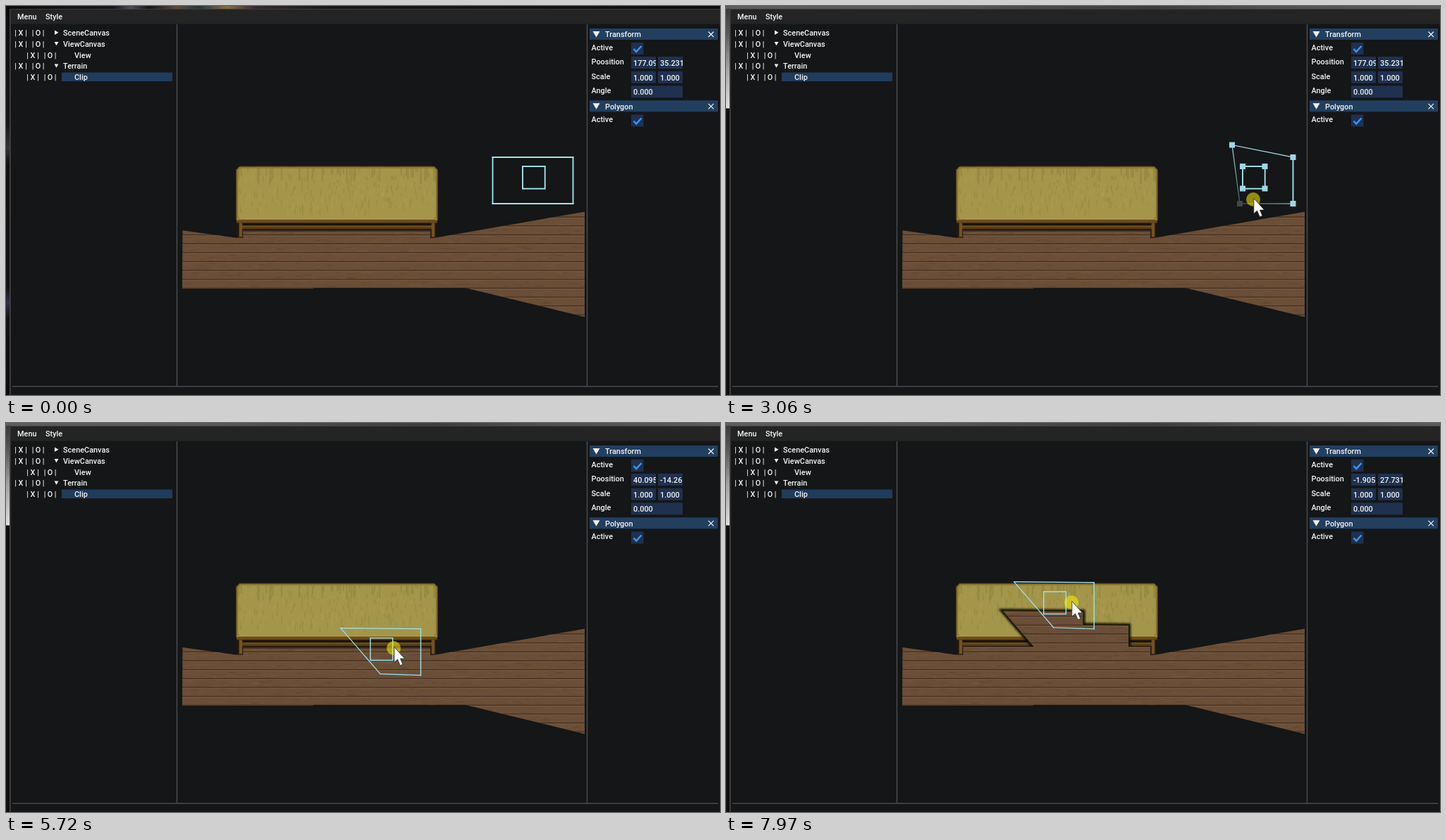
An HTML page that plays this animation: 1013x553 px, repeating every 8000 ms.

```html
<!DOCTYPE html>
<html lang="en">
<head>
<meta charset="utf-8">
<title>Terrain clip editor</title>
<style>
  html, body { margin: 0; width: 100%; height: 100%; overflow: hidden; background: #141617; }
  svg { display: block; }
  text { font: 500 10.9px Roboto, sans-serif; fill: #f4f4f4; white-space: pre; }
</style>
</head>
<body>
<svg id="stage" width="100%" height="100%" viewBox="0 0 1013 553" preserveAspectRatio="none"></svg>
<script>
const LOOP = 8000, UNIT = 1.577, UNIT_Y = 1.568;
const BG = '#141617', CYAN = '#9fe3ee', KNOB = '#9bd8e6', DIM = '#3b4a50', FADE = '#48606a';

let seed = 11;
const rnd = (a = 0, b = 1) => {
  seed = (seed * 16807) % 2147483647;
  return a + (b - a) * seed / 2147483647;
};

// ---- markup helpers ----
const $ = id => document.getElementById(id);
const set = (id, attrs) => {
  for (const k in attrs) $(id).setAttribute(k, attrs[k]);
};
const show = (id, on) => set(id, { display: on ? 'inline' : 'none' });
const rect = (x, y, w, h, fill, more = '') =>
  `<rect x="${x}" y="${y}" width="${w}" height="${h}" fill="${fill}" ${more}/>`;
const path = (d, fill, more = '') => `<path d="${d}" fill="${fill}" ${more}/>`;
const stroke = (d, color, w, more = '') => path(d, 'none', `stroke="${color}" stroke-width="${w}" ${more}`);
const text = (x, mid, s, more = '') => `<text x="${x}" y="${mid + 4}" ${more}>${s}</text>`;
const gradient = (id, stops, dir) =>
  `<linearGradient id="${id}" ${dir}>` +
  stops.map(([o, c]) => `<stop offset="${o}" stop-color="${c}"/>`).join('') + '</linearGradient>';

// ---- textures ----
function dashes(n, make) {
  let d = '';
  for (let i = 0; i < n; i++) {
    const [x, y, dx, dy] = make().map(v => +v.toFixed(1));
    d += `M${x} ${y}l${dx} ${dy}`;
  }
  return d;
}

function sofa() {
  const body = 'M331.500 228.500H607.500L612 233V304L609 307H330L327 304V233Z';
  const hang = () => [rnd(330, 609), 231, 0, rnd(3, 22)];
  const streak = () => [rnd(330, 609), rnd(236, 290), 0, rnd(3, 11)];
  return rect(329.5, 307, 7, 22, '#36240c') + rect(331, 307, 4, 21, '#76531b') +
    rect(602.5, 307, 7, 22, '#36240c') + rect(604, 307, 4, 21, '#76531b') +
    rect(336, 308, 267, 10, '#1b150c') + rect(335, 312.3, 269, 4.5, '#5c3f17') +
    rect(335, 312.3, 269, 1.2, '#79562a') + rect(327, 303, 285, 5.5, '#553810') +
    path(body, '#a3964a', 'stroke="#6b4f1c" stroke-width="1.4"') +
    stroke(dashes(55, hang), '#837a3a', 2, 'opacity=".42"') +
    stroke(dashes(150, streak), '#887d39', 1.3, 'opacity=".4"') +
    stroke(dashes(80, streak), '#b2a653', 1.3, 'opacity=".4"') +
    path('M332.500 230H606.500L610.500 234V300L608 303H331L328.500 300V234Z', 'none',
      'stroke="#8b742c" stroke-width="1.4"') +
    stroke('M331 302.500H608', '#b39d48', 1.2) + stroke('M329 305.500H610', '#6c4c17', 3);
}

function floor() {
  const plank = () => [rnd(245, 815), rnd(262, 442), rnd(3, 18), 0];
  let lines = '', glow = '';
  for (let y = 262.1; y < 445; y += 12.65) {
    lines += `M249 ${y.toFixed(1)}H822`;
    glow += `M249 ${(y + 1.3).toFixed(1)}H822`;
  }
  return rect(249, 260, 574, 185, '#6a4e37') +
    stroke(dashes(520, plank), '#5b412d', 1, 'opacity=".5"') +
    stroke(dashes(420, plank), '#7b5c44', 1, 'opacity=".5"') +
    stroke(lines, '#432e20', 1.3) + stroke(glow, '#7f6048', 1, 'opacity=".8"') +
    stroke('M336 319H602', '#1a1009', 3, 'id="underSofa" opacity=".65"');
}

// ---- editor panels ----
const toggles = (x, y) =>
  [['|', 0], ['X', 7.5], ['|', 15], ['|', 24.5], ['O', 32], ['|', 39.5]]
    .map(([s, dx]) => text(x + dx, y, s, 'text-anchor="middle"')).join('');
const down = (x, y, r) => path(`M${x - r} ${y - r * .8}h${2 * r}l${-r} ${r * 1.7}z`, '#f4f4f4');

function tree() {
  return toggles(13.5, 38) + path('M69 34.500l5.500 3.300l-5.500 3.300z', '#f4f4f4') + text(81, 38, 'SceneCanvas') +
    toggles(13.5, 53.7) + down(71.5, 53.5, 3) + text(81, 53.7, 'ViewCanvas') +
    toggles(30.5, 69.5) + text(97, 69.5, 'View') +
    toggles(13.5, 85.3) + down(71.5, 85, 3) + text(81, 85.3, 'Terrain') +
    rect(79, 94.5, 157, 12.5, '#203c5d') + toggles(30.5, 101) + text(97, 101, 'Clip');
}

const header = (y, s) => rect(828, y, 182, 16, '#223f60') + down(837.5, y + 8, 5) + text(850, y + 8.3, s) +
  stroke(`M996.500 ${y + 4.5}l7.500 7.500m0 -7.500l-7.500 7.500`, '#f4f4f4', 1.2);
const check = y => rect(887, y, 17.5, 17, '#1f314e') +
  stroke(`M890.500 ${y + 9}l3.700 4l7.300 -8`, '#4296fa', 2.4);
const field = (x, y, w, s, id) => rect(x, y, w, 17, '#1f314e') +
  `<svg x="${x}" y="${y}" width="${w}" height="17"><text x="3" y="13" id="${id}">${s}</text></svg>`;

function inspector() {
  return header(32, 'Transform') + text(830.5, 58.5, 'Active') + check(52) +
    text(830.5, 79, 'Poosition') + field(887, 72, 35, '', 'posX') + field(925, 72, 35, '', 'posY') +
    text(830.5, 100, 'Scale') + field(887, 92.7, 35, '1.000', 'scaleX') + field(925, 92.7, 35, '1.000', 'scaleY') +
    text(830.5, 120, 'Angle') + field(887, 113.3, 73, '0.000', 'angle') +
    header(134.3, 'Polygon') + text(830.5, 161, 'Active') + check(154.5);
}

// ---- clip polygon ----
const EDGES = [0, 1, 2, 3];
const outline = (tl, bl) => [tl, [804.5, 215], [804.5, 281], bl];
const DONE = outline([691, 214], [747, 279]);
const stampPath = (ux, uy) =>
  'M' + DONE.map(([x, y]) => `${(x + ux * UNIT).toFixed(1)} ${(y + uy * UNIT_Y).toFixed(1)}`).join('L') + 'Z';
const STAMPS = [[6190, stampPath(-148, 46.5)], [7350, stampPath(-189, 34)]];

$('stage').innerHTML = '<defs>' +
  gradient('topA', [[0, '#0d0d0f'], [.15, '#18151b'], [.175, '#514a58'], [.2, '#151518'], [.24, '#5c4a42'],
    [.27, '#28333a'], [.31, '#846c45'], [.35, '#332b30'], [.45, '#17171a'], [1, '#0d0d0f']], '') +
  gradient('topB', [[0, '#5c5c5c'], [.3, '#585858'], [.45, '#474747'], [.6, '#3c3c3c'], [.75, '#505050'], [1, '#5a5a5a']], '') +
  gradient('side', [[0, '#3a3a3a'], [.25, '#5a5a5a'], [.6, '#a4a4a4'], [1, '#dedede']], 'x2="0" y2="1"') +
  gradient('sideA', [[0, '#0b0b0d'], [.3, '#17171a'], [.36, '#343238'], [.4, '#111'], [.72, '#121215'],
    [.76, '#352c45'], [.8, '#121215'], [1, '#0b0b0d']], 'x2="0" y2="1"') +
  EDGES.map(i => gradient('edge' + i, [], 'gradientUnits="userSpaceOnUse"')).join('') +
  '<filter id="blur" x="-20%" y="-40%" width="140%" height="180%"><feGaussianBlur stdDeviation="1.8"/></filter>' +
  '<clipPath id="ground">' +
  path('M250.500 319L326 329.500H336.500V318H602V330L612 329L821 292.500V442L652 400.700H436V401.800H250Z', '#fff') +
  STAMPS.map(([, d], i) => path(d, '#fff', `id="cut${i}"`)).join('') + '</clipPath></defs>' +
  rect(0, 0, 1013, 553, BG) +
  '<g id="deskA">' + rect(0, 0, 1013, 4, 'url(#topA)') + rect(0, 4, 5, 549, 'url(#sideA)') + '</g>' +
  '<g id="deskB">' + rect(0, 0, 1013, 4, 'url(#topB)') + rect(0, 4, 5, 549, '#0f0f10') +
  rect(0, 4, 5, 141.5, 'url(#side)') + '</g>' +
  rect(5, 4, 1.7, 549, '#434346') + rect(5, 4, 1008, 1.2, '#3d3d40') +
  rect(6.7, 5, 1006.3, 20.5, '#242424') + text(16, 14.5, 'Menu') + text(56, 14.5, 'Style') +
  stroke('M242.500 26V540M824.500 26V540M9 540.700H1010', '#484a50', 1.5) +
  tree() + inspector() + sofa() +
  STAMPS.map(([, d], i) => path(d, '#0c0804',
    `id="shade${i}" stroke="#0c0804" stroke-width="6" filter="url(#blur)"`)).join('') +
  `<g clip-path="url(#ground)">${floor()}</g>` +
  path('M457 286L490 289L488 310L484 318Z', '#111110', 'id="wedge"') +
  '<g id="clip">' + EDGES.map(i => `<line id="line${i}" stroke-linecap="square"/>`).join('') +
  rect(733, 228, 31.7, 31.7, 'none', `id="inner" stroke="${CYAN}"`) +
  '<g id="handles">' + EDGES.map(i => rect(0, 0, 8, 8, KNOB, `id="knob${i}"`)).join('') +
  [[733, 228], [764.5, 228], [733, 259.5], [764.5, 259.5]]
    .map(([x, y]) => rect(x - 4, y - 4, 8, 8, KNOB)).join('') + '</g></g>' +
  '<g id="cursor"><circle r="10" fill="#fff200" opacity=".54"/>' +
  path('M.8 -1.500V20.300L5.500 16L9.300 24.700L13 23.200L9.500 15H15.800Z', '#fff', 'stroke="#222" stroke-width=".8"') + '</g>';

// ---- motion: rows of [ms, x, y] ----
function at(keys, t) {
  const n = keys.findIndex(k => k[0] > t);
  if (n === 0) return keys[0].slice(1);
  if (n < 0) return keys[keys.length - 1].slice(1);
  const a = keys[n - 1], b = keys[n], u = (t - a[0]) / (b[0] - a[0]), e = u * u * (3 - 2 * u);
  return [a[1] + (b[1] - a[1]) * e, a[2] + (b[2] - a[2]) * e];
}
const POINTER = [
  [70, 712, 262], [840, 692, 222], [910, 692, 218], [1260, 718, 199], [1680, 702, 262], [1820, 693, 278],
  [2020, 693, 278], [2400, 712, 285], [2720, 735, 280], [2850, 735, 280], [3060, 748, 275], [3250, 747, 277],
  [3620, 722, 212], [3690, 718, 203], [4250, 687, 216], [4530, 690, 216], [4850, 766, 242],
  [5300, 660, 252], [5720, 550, 320], [5990, 532, 316], [6190, 532, 316], [6810, 478, 302],
  [6950, 474, 288], [7150, 475, 285], [7350, 475, 285], [7970, 490, 255]];
const TOP_LEFT = [[910, 690.5, 215], [1260, 718, 197.5], [3690, 718, 197.5], [4250, 690, 217], [4500, 691, 214]];
const BOTTOM_LEFT = [[2090, 690.5, 281], [2720, 729, 281], [3060, 729, 281], [3250, 747, 279]];
const OFFSET = [
  [4850, 0, 0], [5300, -67, 7], [5720, -137, 49.5], [5990, -148, 46.5], [6190, -148, 46.5],
  [6810, -192, 46], [6950, -190, 36], [7150, -189, 34], [7350, -189, 34], [7970, -179, 7.5]];
const EDIT_START = 70, EDIT_END = 4600;

// Index of the selected corner, or -1.
function picked(t) {
  if (t < 910 || t >= EDIT_END) return -1;
  return t >= 2090 && t < 3690 ? 3 : 0;
}

function drawClip(t) {
  const pts = outline(at(TOP_LEFT, t), at(BOTTOM_LEFT, t)), sel = picked(t);
  const width = t >= EDIT_END ? 1.4 : 1.9;
  EDGES.forEach(i => {
    const j = (i + 1) % 4, [x1, y1] = pts[i], [x2, y2] = pts[j];
    const ends = { x1, y1, x2, y2 }, faded = sel === i || sel === j;
    const slanted = Math.abs(x1 - x2) > 2 && Math.abs(y1 - y2) > 1.5;
    set('edge' + i, ends);
    $('edge' + i).innerHTML = [i, j].map((k, o) =>
      `<stop offset="${o}" stop-color="${k === sel ? FADE : CYAN}"/>`).join('');
    set('line' + i, { ...ends, stroke: faded ? `url(#edge${i})` : CYAN,
      'stroke-width': faded || slanted ? 1.2 : width });
    set('knob' + i, { x: x1 - 4, y: y1 - 4, fill: i === sel ? DIM : KNOB });
  });
  set('inner', { 'stroke-width': width });
  show('handles', t >= EDIT_START && t < EDIT_END);

  let [ux, uy] = at(OFFSET, t);
  ux = Math.round(ux);
  uy = Math.round(uy * 2) / 2;
  set('clip', { transform: `translate(${ux * UNIT} ${uy * UNIT_Y})` });
  $('posX').textContent = (177.095 + ux).toFixed(3);
  $('posY').textContent = (35.231 - uy).toFixed(3);
}

function draw(t) {
  show('deskA', t < EDIT_START);
  show('deskB', t >= EDIT_START);
  show('cursor', t >= EDIT_START);
  set('cursor', { transform: `translate(${at(POINTER, t).join(' ')})` });
  STAMPS.forEach(([start], i) => {
    show('cut' + i, t >= start);
    show('shade' + i, t >= start);
  });
  show('underSofa', t < STAMPS[0][0]);
  show('wedge', t >= STAMPS[0][0] && t < STAMPS[1][0]);
  drawClip(t);
}

const begin = performance.now();
function tick() {
  draw((performance.now() - begin) % LOOP);
  requestAnimationFrame(tick);
}
tick();
</script>
</body>
</html>
```
